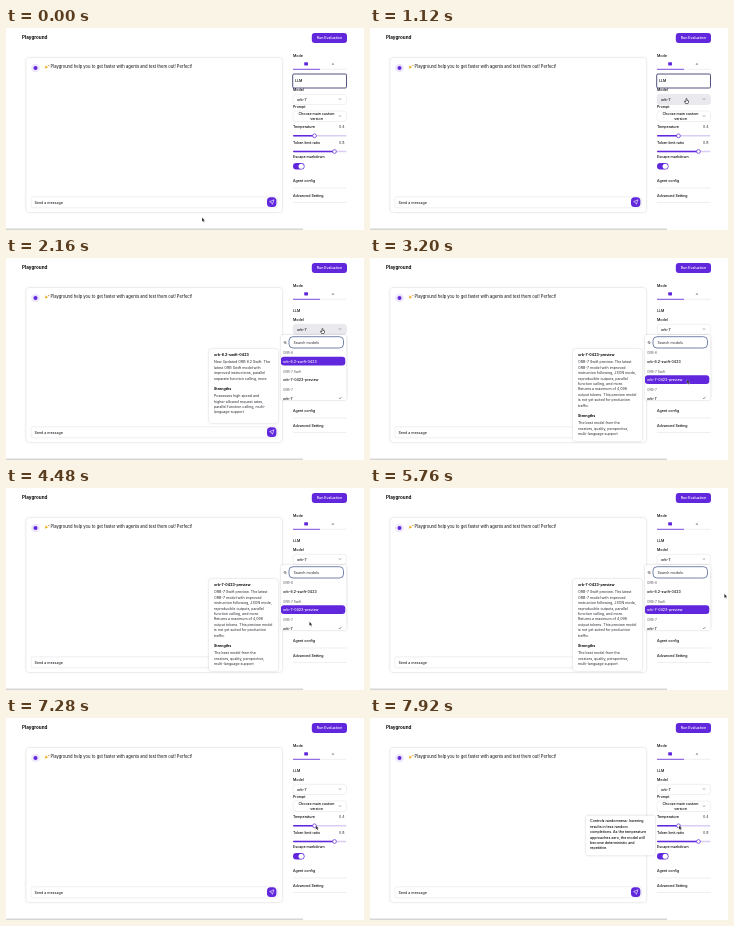
Write an HTML page that moves like this. It is 358 px wide and 202 px high and loops after 8 s.

```html
<!DOCTYPE html>
<html lang="en">
<head>
<meta charset="utf-8">
<title>Playground</title>
<style>
  html, body { margin: 0; width: 100%; height: 100%; overflow: hidden; background: #fff; }
  svg { display: block; width: 100vw; height: 100vh; }
  text { font: 3.6px Inter, Arial, sans-serif; fill: #08080c; }
  .label { font-weight: 500; }
  .bold { font-weight: 700; }
  .title { font-size: 4.55px; font-weight: 700; }
  .greeting { font-size: 4.15px; }
  .body { fill: #2c2c34; }
  .muted { fill: #55555f; font-size: 3.2px; }
  .white { fill: #fff; }
  .mid { text-anchor: middle; }
  .purple { fill: #6127dd; }
  .field { fill: #fff; stroke: #e0e0e6; stroke-width: .5; }
  .rule { stroke: #dfdfe6; stroke-width: .5; }
  .line { fill: none; stroke: #6127dd; stroke-width: .8; }
  .thin { fill: none; stroke: #33333b; stroke-width: .5; }
  .card { fill: #fff; filter: drop-shadow(0 .8px 1.2px #0003); }
</style>
</head>
<body>
<svg viewBox="0 0 358 202" preserveAspectRatio="none">
  <defs>
    <linearGradient id="edge" x2="0" y2="1"><stop stop-color="#fff"/><stop offset="1" stop-color="#ccc"/></linearGradient>
    <clipPath id="listClip"><rect x="275" y="77" width="65.5" height="65"/></clipPath>
  </defs>
  <g id="page"></g>
  <g id="focus"></g>
  <g id="menu"></g>
  <g id="tipFast"></g>
  <g id="tipPreview"></g>
  <g id="tipTemperature"></g>
  <path id="arrow" d="M0 0V4.2L1 3.3L1.7 4.8L2.4 4.5L1.7 3H3Z" fill="#111" stroke="#fff" stroke-width=".3"/>
  <path id="hand" d="M-.5 0Q0 -.6 .5 0V1.6L2 2V3.6L1.4 4.8H-.9L-1.9 3V2.3L-.5 2.8Z" fill="#fff" stroke="#111" stroke-width=".6"/>
</svg>
<script>
const LOOP = 8000;
const $ = id => document.getElementById(id);
const text = (x, y, s, cls = 'label', extra = '') =>
  `<text x="${x}" y="${y + 1.3}" class="${cls}" ${extra}>${s}</text>`;
const rect = (x, y, w, h, r, cls, extra = '') =>
  `<rect x="${x}" y="${y}" width="${w}" height="${h}" rx="${r}" class="${cls}" ${extra}/>`;
const path = (d, cls) => `<path d="${d}" class="${cls}"/>`;
const rule = y => path(`M287 ${y}H340.5`, 'rule');
const chevron = (x, y) => path(`M${x - 1} ${y - .5}l1 1l1 -1`, 'thin');
const paragraph = (x, y, lines, cls) => lines.map((s, i) => text(x, y + i * 5.4, s, cls)).join('');

function slider(y, name, value, knob) {
  return text(287, y, name) + text(333, y, value, 'body') +
    rect(287, y + 8.1, 53.5, 1.5, .75, '', 'fill="#d9cdf5"') +
    rect(287, y + 8.1, knob - 287, 1.5, .75, 'purple') +
    `<circle cx="${knob}" cy="${y + 8.8}" r="1.9" fill="#fff" stroke="#6127dd" stroke-width=".7"/>`;
}

function modelTip(height, name, about, strengths) {
  const second = 104 + about.length * 5.4 + 5.4;
  return rect(203, 91, 69, height, 3, 'card') + text(208, 97, name, 'bold') +
    paragraph(208, 104, about, 'body') + text(208, second, 'Strengths', 'bold') +
    paragraph(208, second + 6.8, strengths, 'body');
}

$('page').innerHTML =
  rect(0, 0, 358, 202, 0, 'white') +
  rect(0, 199.5, 297, 2.5, 0, '', 'fill="url(#edge)"') +
  text(16, 10, 'Playground', 'title') +
  rect(305.8, 5, 35.2, 10, 3, 'purple') + text(323.4, 10, 'Run Evaluation', 'label white mid') +
  // chat
  rect(20.3, 30, 255.7, 154, 3, 'card') +
  '<circle cx="29.5" cy="40" r="4.3" fill="#eee7fc"/><circle cx="29.5" cy="40" r="2" class="purple"/>' +
  '<path d="M38.8 40.7l.8 -3.4l2.6 2.2Z" fill="#f2b632"/><circle cx="42.8" cy="37.6" r=".7" fill="#e58a3a"/>' +
  text(44.5, 38.8, 'Playground help you to get faster with agents and test them out! Perfect!', 'greeting') +
  rect(25, 168.8, 246.5, 11, 2, 'field') + text(28.5, 174.2, 'Send a message', 'body label') +
  rect(261, 169.2, 9.4, 9.8, 3.5, 'purple') +
  '<path d="M263.6 173.6l4.4 -1.8l-1.6 4.5l-1 -1.8Z" fill="none" stroke="#fff" stroke-width=".6"/>' +
  // settings
  text(287, 27.3, 'Mode') + rule(41.3) + path('M287 41.3H314', 'line') +
  rect(298.2, 34.2, 3.8, 3.2, .6, 'purple') + path('M326.1 36.9l.8 -1.5l.8 1.5', 'thin') +
  text(287, 53, 'LLM', 'label', 'id="plainName"') +
  text(287, 62, 'Model') + rect(287, 66.3, 53.5, 10.2, 3, 'field', 'id="select"') +
  text(291, 71.3, 'orb-7') + chevron(334, 71) +
  text(287, 79, 'Prompt') + rect(287, 83, 53.5, 10.5, 3, 'field') +
  text(310.5, 86, 'Choose main custom', 'label mid') + text(310.5, 91, 'version', 'label mid') + chevron(334, 88) +
  slider(99, 'Temperature', '0.4', 308.5) +
  slider(114.7, 'Token limit ratio', '0.8', 328.5) +
  text(287, 128.8, 'Escape markdown') + rect(287, 135, 11.5, 6.5, 3.25, 'purple') +
  '<circle cx="295.2" cy="138.25" r="2.6" fill="#fff"/>' +
  text(287, 153, 'Agent config') + rule(160) +
  text(287, 167.5, 'Advanced Setting') + rule(174.5);

$('focus').innerHTML =
  rect(286.7, 46, 53.8, 14, 1.2, '', 'fill="#fff" stroke="#25265e" stroke-width=".8"') + text(289, 53, 'LLM');

$('menu').innerHTML =
  rect(275, 77, 65.5, 65, 2, 'card') +
  rect(283, 78.7, 54.5, 11.3, 4, '', 'fill="#fff" stroke="#3d5088" stroke-width=".7"') +
  text(287.5, 84.3, 'Search models', 'body') + path('M279 83.5a1 1 0 1 0 .1 0m.7 1.8l.8 .8', 'thin') +
  '<g clip-path="url(#listClip)">' +
  rect(274.8, 0, 64.5, 8.6, 3, 'purple', 'id="highlight"') +
  text(277, 95, 'ORB-6', 'muted') + text(277, 103.2, 'orb-6.2-swift-0423', 'label item') +
  text(277, 113.2, 'ORB-7 Swift', 'muted') + text(277, 121.7, 'orb-7-0423-preview', 'label item') +
  text(277, 132, 'ORB-7', 'muted') + text(277, 140.4, 'orb-7') +
  path('M333 140l.8 .9l1.7 -2', 'thin') + '</g>';

$('tipFast').innerHTML = modelTip(74, 'orb-6.2-swift-0423',
  ['New Updated ORB 6.2 Swift. The', 'latest ORB Swift model with', 'improved instructions, parallel', 'separate function calling, more'],
  ['Possesses high speed and', 'higher allowed request rates,', 'parallel function calling, multi-', 'language support']);

$('tipPreview').innerHTML = modelTip(92, 'orb-7-0423-preview',
  ['ORB-7 Swift preview. The latest', 'ORB-7 model with improved', 'instruction following, JSON mode,', 'reproducible outputs, parallel',
   'function calling, and more.', 'Returns a maximum of 4,096', 'output tokens. This preview model', 'is not yet suited for production', 'traffic.'],
  ['The best model from the', 'creators, quality, perspective,', 'multi-language support']);

$('tipTemperature').innerHTML = rect(216, 97.8, 69, 39.4, 2, 'card') +
  paragraph(220, 103, ['Controls randomness: lowering', 'results in less random', 'completions. As the temperature',
    'approaches zero, the model will', 'become deterministic and', 'repetitive.'], 'label');

// Pointer stops: time, x, y
const stops = [
  [0, 196, 189.5], [80, 196, 189.5], [960, 318, 75], [1120, 316.5, 70.8], [2320, 316.5, 70.8],
  [2960, 317, 121.5], [3760, 317, 122], [4560, 303, 134], [4720, 303, 134],
  [5440, 354, 106], [6080, 354.5, 105.5], [6480, 338.8, 95], [6960, 317, 108],
  [7360, 309, 107.5], [8000, 309, 107.5]
];

function pointerAt(t) {
  const i = stops.findIndex(s => s[0] > t);
  const [t0, x0, y0] = stops[i - 1], [t1, x1, y1] = stops[i];
  const u = (t - t0) / (t1 - t0), e = u * u * (3 - 2 * u);
  return [x0 + (x1 - x0) * e, y0 + (y1 - y0) * e];
}

const fade = (t, start, end) =>
  Math.max(0, Math.min(1, (t - start) / 160, (end - t) / 100));

function draw(now) {
  const t = now % LOOP, [x, y] = pointerAt(t);
  const overSelect = x > 287 && x < 340 && y > 66 && y < 77;
  const open = fade(t, 1520, 5920);
  const second = t > 2400 && y > 116 || t > 2960;
  const show = (id, alpha) => $(id).setAttribute('opacity', Number(alpha));

  $('select').style.fill = overSelect ? '#e9e9ee' : '#fff';
  show('focus', t < 1520);
  show('plainName', t >= 1520);
  show('menu', open);
  show('tipFast', second ? 0 : fade(t, 1680, 5920));
  show('tipPreview', second ? open : 0);
  show('tipTemperature', fade(t, 7660, LOOP + 200));

  $('highlight').setAttribute('y', second ? 117.3 : 98.8);
  document.querySelectorAll('.item').forEach((el, i) => el.classList.toggle('white', second === (i === 1)));

  show('hand', overSelect);
  show('arrow', !overSelect);
  for (const id of ['arrow', 'hand']) $(id).setAttribute('transform', `translate(${x} ${y})`);
}

const start = performance.now();
function tick() {
  draw(performance.now() - start);
  requestAnimationFrame(tick);
}
tick();
</script>
</body>
</html>
```
